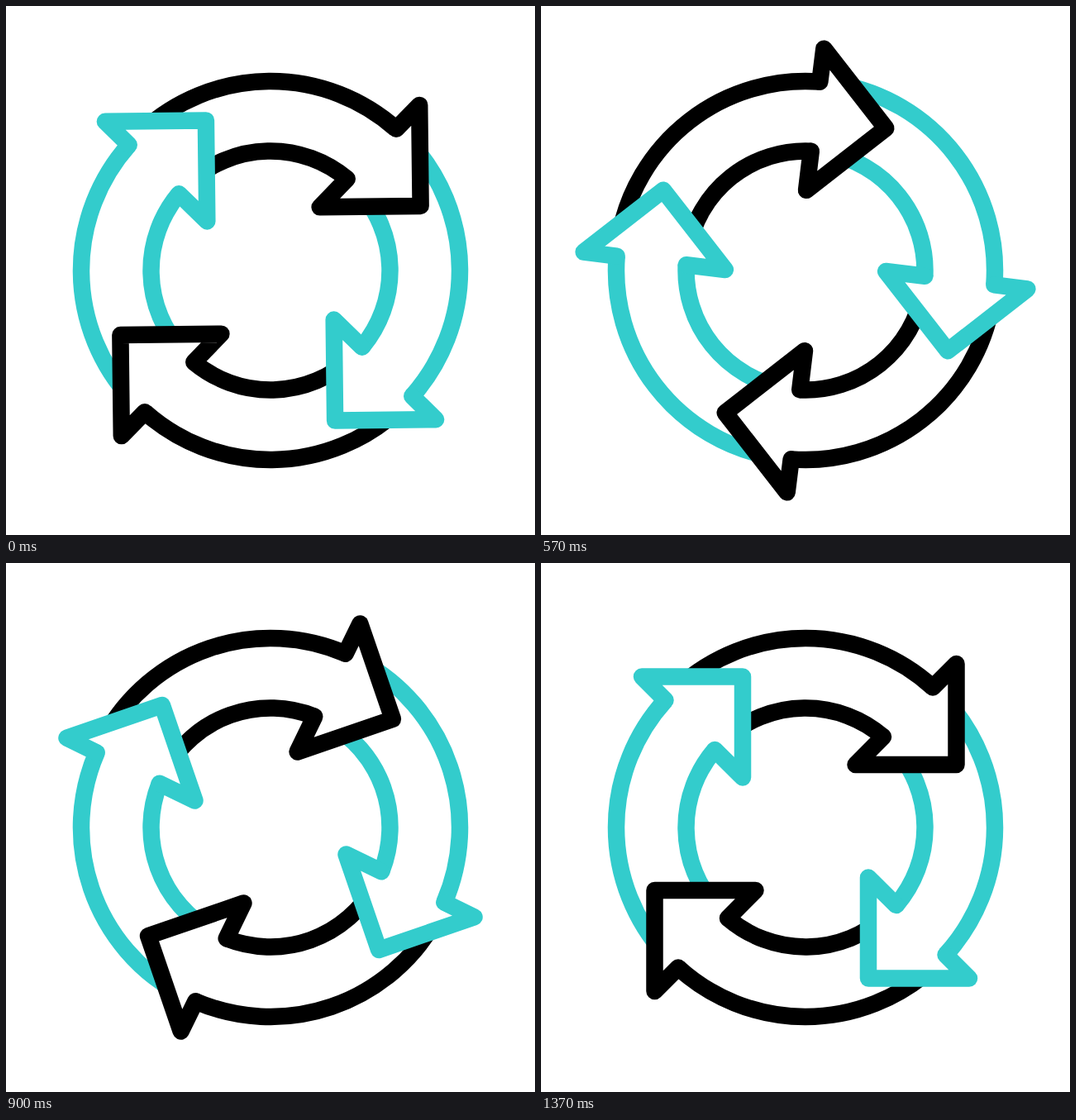
An HTML page that plays this animation: 640 by 640 pixels, repeating every 1.67 s.

```html
<!DOCTYPE html>
<html lang="en">
<head>
<meta charset="utf-8">
<title>Circling arrows</title>
<style>
  html, body { margin: 0; height: 100%; overflow: hidden; background: #fff; }
  svg { display: block; width: 100vw; height: 100vh; }
</style>
</head>
<body>
<svg viewBox="-320 -320 640 640">
  <defs>
    <path id="tail" fill="none" d="M-153.2 -170.2A229 229 0 0 1 154 -169.5M-96.7 -107.4A144.5 144.5 0 0 1 94 -109.7"/>
    <path id="head" fill="#fff" d="M154 -169.5L182.5 -198V-76H60.5L94 -109.7"/>
  </defs>
  <g id="wheel" stroke-width="20.5" stroke-linecap="round" stroke-linejoin="round"></g>
</svg>
<script>
const LOOP = 1670, FPS = 30, LAST = 41;
const BACK = -55.5, BACK_END = 13.9, SPIN_END = 41.75, LEAD = 1.15;
const wheel = document.getElementById('wheel');

// All tails lie below all heads, so every head overlaps the next tail.
for (const part of ['tail', 'head']) {
  for (let i = 0; i < 4; i++) {
    const cap = part === 'tail' ? 'butt' : 'round';
    wheel.innerHTML += `<use href="#${part}" transform="rotate(${i * 90})"
      stroke="${i % 2 ? '#33cccc' : '#000'}" stroke-linecap="${cap}"/>`;
  }
}

// cubic-bezier(k, 0, 1 - k, 1)
function ease(x, k = 0.45) {
  let lo = 0, hi = 1;
  for (let n = 0; n < 30; n++) {
    const s = (lo + hi) / 2, r = 1 - s;
    if (3 * r * r * s * k + 3 * r * s * s * (1 - k) + s * s * s < x) lo = s;
    else hi = s;
  }
  return lo * lo * (3 - 2 * lo);
}

// A short swing back, then a full turn forward.
function angleAt(step) {
  const u = step + LEAD;
  if (u < BACK_END) return BACK * ease(u / BACK_END);
  if (u >= SPIN_END) return 0;
  return BACK + (360 - BACK) * ease((u - BACK_END) / (SPIN_END - BACK_END));
}

function draw() {
  const t = Math.floor(performance.now() % LOOP / 10) * 10;
  const step = Math.min(LAST, Math.floor((t + 4) * FPS / 1000));
  wheel.setAttribute('transform', `rotate(${angleAt(step)})`);
  requestAnimationFrame(draw);
}
draw();
</script>
</body>
</html>
```
